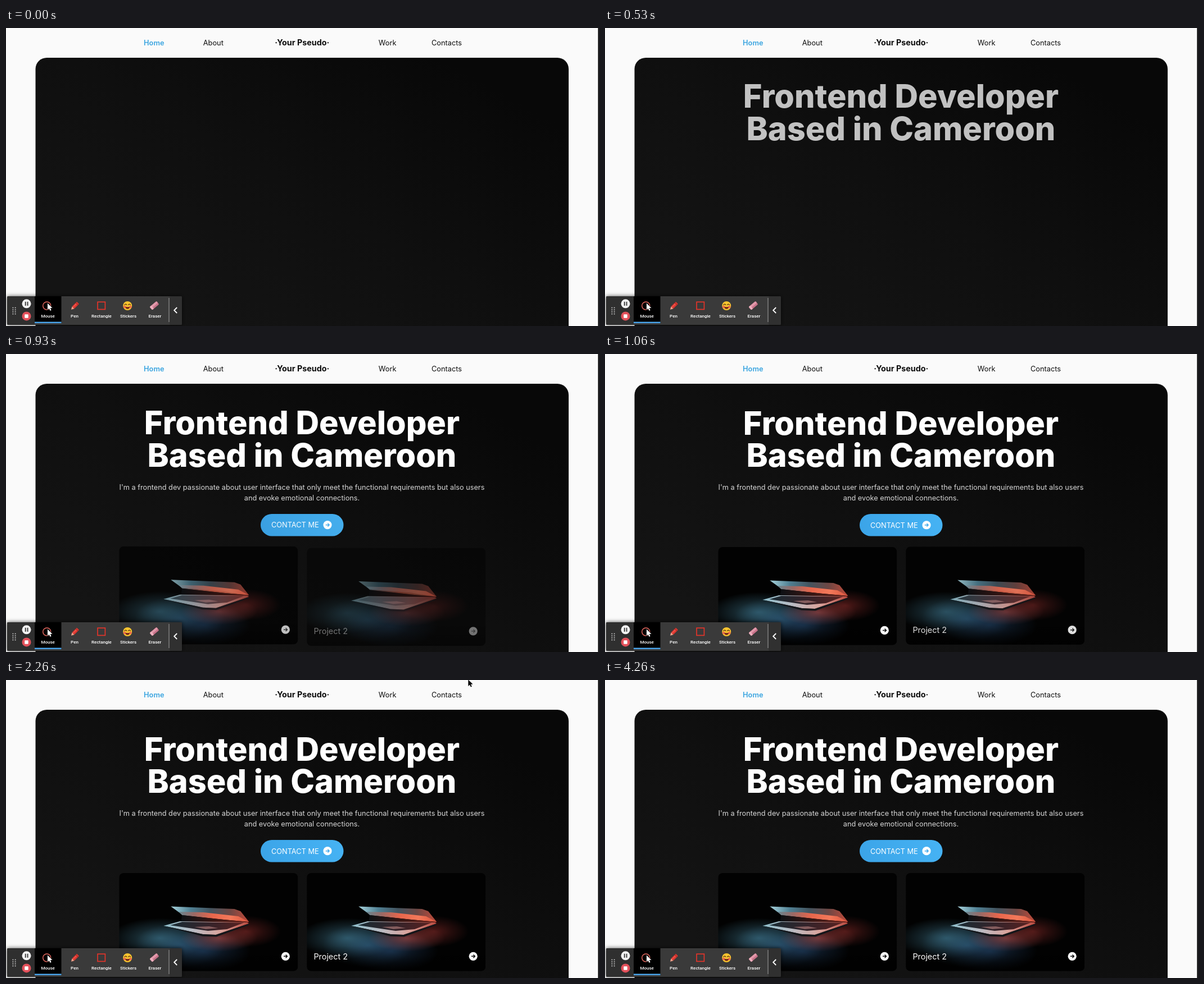
Animation of 1055x531 px, one loop 5730 ms. Source, as an HTML page with a canvas:

```html
<!DOCTYPE html>
<html lang="en">
<head>
<meta charset="utf-8">
<title>Portfolio hero</title>
<style>
  html, body { margin: 0; width: 100%; height: 100%; overflow: hidden; background: #fafafa; }
  canvas, svg { position: absolute; left: 0; top: 0; width: 1055px; height: 531px; }
  text { font: 400 12.8px Inter, sans-serif; font-optical-sizing: none; fill: #0c0c0c; }
  .mid { text-anchor: middle; }
  .home { font-weight: 600; fill: #3ba5e0; }
  .logo { font-size: 14.3px; font-weight: 700; }
  .title text { font-size: 57.6px; font-weight: 800; fill: #fff; }
  .intro text { font-size: 12.74px; fill: #d6d6d6; }
  .light { fill: #fff; }
  .label { font-size: 14.4px; fill: #fff; }
  .tools text { font: 500 8px Roboto, sans-serif; fill: #fff; text-anchor: middle; }
</style>
</head>
<body>
<canvas id="stage"></canvas>
<svg viewBox="0 0 1055 531">
  <text class="mid home" x="263.3" y="31">Home</text>
  <text class="mid" x="368.8" y="31">About</text>
  <text class="mid logo" x="526.7" y="31">·Your Pseudo·</text>
  <text class="mid" x="678.7" y="31">Work</text>
  <text class="mid" x="784" y="31">Contacts</text>
  <g class="title" data-step="title">
    <text class="mid" x="526.5" y="143.5">Frontend Developer</text>
    <text class="mid" x="526.5" y="201.1">Based in Cameroon</text>
  </g>
  <g class="intro" data-step="intro">
    <text class="mid" x="526.5" y="242">I'm a frontend dev passionate about user interface that only meet the functional requirements but also users</text>
    <text class="mid" x="526.5" y="261.2">and evoke emotional connections.</text>
  </g>
  <g data-step="button"><text class="mid light" x="514.3" y="309.6">CONTACT ME</text></g>
  <g data-step="cardB"><text class="label" x="547.4" y="497.5">Project 2</text></g>
  <g class="tools">
    <text x="74.7" y="515.6">Mouse</text>
    <text x="122" y="515.6">Pen</text>
    <text x="170" y="515.6">Rectangle</text>
    <text x="217.5" y="515.6">Stickers</text>
    <text x="265" y="515.6">Eraser</text>
  </g>
</svg>
<script>
const W = 1055, H = 531, LOOP = 5730;
const FADE = 300, RISE = 10;
const starts = { title: 352, intro: 573, button: 660, cardA: 750, cardB: 837 };
const CURSOR_IN = 2200, CURSOR_OUT = 4260;

const canvas = document.getElementById('stage');
const ctx = canvas.getContext('2d');
const groups = [...document.querySelectorAll('[data-step]')];
const dpr = window.devicePixelRatio || 1;
canvas.width = W * dpr;
canvas.height = H * dpr;

// Fade in while an underdamped spring brings the part up to its place.
function entrance(step, time) {
  const ms = time - starts[step];
  if (ms <= 0) return { alpha: 0, y: RISE };
  const alpha = 1 - Math.pow(1 - Math.min(1, ms / FADE), 1.5);
  const s = ms / 1000, decay = 12.5, freq = 18.54;
  const swing = Math.cos(freq * s) + decay / freq * Math.sin(freq * s);
  return { alpha, y: RISE * Math.exp(-decay * s) * swing };
}

function box(x, y, w, h, fill, r = 0) {
  ctx.beginPath();
  ctx.roundRect(x, y, w, h, r);
  ctx.fillStyle = fill;
  ctx.fill();
}

function disc(x, y, r, fill) {
  ctx.beginPath();
  ctx.arc(x, y, r, 0, Math.PI * 2);
  ctx.fillStyle = fill;
  ctx.fill();
}

function trace(points, close = true) {
  ctx.beginPath();
  points.forEach(([x, y]) => ctx.lineTo(x, y));
  if (close) ctx.closePath();
}

function shape(fill, ...points) {
  trace(points);
  ctx.fillStyle = fill;
  ctx.fill();
}

function line(color, width, ...points) {
  trace(points, false);
  ctx.strokeStyle = color;
  ctx.lineWidth = width;
  ctx.stroke();
}

function blend(x0, y0, x1, y1, ...colors) {
  const g = ctx.createLinearGradient(x0, y0, x1, y1);
  colors.forEach((c, i) => g.addColorStop(i / (colors.length - 1), c));
  return g;
}

function at(x, y, draw, angle = 0) {
  ctx.save();
  ctx.translate(x, y);
  ctx.rotate(angle);
  draw();
  ctx.restore();
}

function glow(x, y, rx, ry, rgb, alpha, angle = 0) {
  at(x, y, () => {
    ctx.scale(1, ry / rx);
    const g = ctx.createRadialGradient(0, 0, 0, 0, 0, rx);
    g.addColorStop(0, `rgba(${rgb},${alpha})`);
    g.addColorStop(.5, `rgba(${rgb},${alpha * .45})`);
    g.addColorStop(1, `rgba(${rgb},0)`);
    disc(0, 0, rx, g);
  }, angle);
}

function arrowBadge(x, y, color) {
  disc(x, y, 7.6, '#fff');
  line(color, 1.5, [x - 3.3, y], [x + 2.6, y]);
  line(color, 1.5, [x + .3, y - 2.8], [x + 3.1, y], [x + .3, y + 2.8]);
}

function pointer(x, y, fill, edge) {
  at(x, y, () => {
    trace([[0, 0], [0, 11.5], [2.7, 9.2], [4.6, 13.2], [6.5, 12.3], [4.7, 8.4], [8.3, 8.2]]);
    ctx.strokeStyle = edge;
    ctx.lineWidth = 1.4;
    ctx.stroke();
    ctx.fillStyle = fill;
    ctx.fill();
  });
}

function laptop() {
  glow(72, 116, 88, 36, '70,132,156', .6);
  glow(108, 128, 80, 40, '60,118,152', .5);
  glow(150, 140, 84, 36, '40,78,122', .6);
  glow(178, 116, 68, 24, '186,84,84', .6);
  glow(226, 104, 62, 28, '130,40,38', .6);

  // Lid, with the lit screen showing along its lower edge.
  shape(blend(93, 0, 231, 0, '#a4d0da', '#4f7f92', '#43545f', '#6e4744', '#c24a39'),
    [92, 59.5], [205, 64], [216, 68], [231, 87], [186, 80], [112, 74]);
  shape(blend(100, 0, 231, 0, '#5d8d9c', '#9a6a66', '#e8664c', '#f4795a', '#d9553f'),
    [106, 69], [150, 70], [212, 77], [231, 87], [186, 83], [112, 75]);
  shape(blend(110, 0, 231, 0, '#0c1014', '#3b1714', '#6b231d'),
    [112, 75], [186, 83], [231, 87], [228, 89], [110, 87]);

  // Base: rim, keyboard, palm rest and front edge.
  shape(blend(80, 0, 231, 0, '#8dbecb', '#b9bcc4', '#d9a39c', '#b8473c'),
    [79, 94], [108, 86], [228, 88], [231, 90], [172, 110], [149, 109]);
  shape(blend(95, 0, 225, 0, '#1a2a32', '#35232a', '#5a211f'),
    [91, 93], [112, 87], [222, 88.5], [192, 100], [158, 103]);
  shape('rgba(214,150,146,.5)', [134, 96], [160, 95], [176, 98], [154, 100]);
  shape('#14161a', [79, 94], [149, 109], [172, 110], [231, 90], [230, 93], [173, 113.5], [148, 112.5]);
}

function card(x, step, time) {
  const { alpha, y } = entrance(step, time);
  ctx.globalAlpha = alpha;
  at(x, 344 + y, () => {
    ctx.beginPath();
    ctx.roundRect(0, 0, 318, 174.5, 8);
    ctx.clip();
    box(0, 0, 318, 175, '#020202');
    laptop();
    box(0, 130, 318, 45, blend(0, 130, 0, 175, 'rgba(0,0,0,0)', 'rgba(0,0,0,.7)'));
    arrowBadge(296, 148.3, '#080808');
  });
  ctx.globalAlpha = 1;
}

function button(time) {
  const { alpha, y } = entrance('button', time);
  ctx.globalAlpha = alpha;
  at(0, y, () => {
    box(453, 285, 147.5, 39.5, blend(453, 324, 600, 285, '#3ba4e8', '#46b3f4'), 19.75);
    arrowBadge(572, 304.7, '#3fa9ec');
  });
  ctx.globalAlpha = 1;
}

function sticker() {
  disc(0, 0, 8, '#f8c52f');
  disc(-5, 2, 2.3, '#ee6a4c');
  disc(5, 2, 2.3, '#ee6a4c');
  for (const x of [-3.3, 3.3]) {
    ctx.beginPath();
    ctx.arc(x, -1, 1.9, Math.PI, 0);
    ctx.strokeStyle = '#5b3414';
    ctx.lineWidth = 1.2;
    ctx.stroke();
  }
  ctx.beginPath();
  ctx.arc(0, 2, 3.7, 0, Math.PI);
  ctx.fillStyle = '#7a2a1c';
  ctx.fill();
}

function pen() {
  box(-5, -2.8, 12, 5.6, '#e0362f', 1);
  box(4, -2.8, 1, 5.6, '#8f2522');
  shape('#f0a08a', [-5, -2.8], [-10, 0], [-5, 2.8]);
  line('#f36b60', 1, [-5, -.7], [4, -.7]);
}

function eraser() {
  box(-8, -3.6, 16, 7.2, '#c8728a', 1.6);
  box(-8, -3.6, 16, 4, '#e298aa', 1.6);
  box(-8, -3.6, 4, 7.2, '#ecb0be', 1.6);
}

function toolbar() {
  ctx.save();
  ctx.shadowColor = 'rgba(0,0,0,.7)';
  ctx.shadowBlur = 7 * dpr;
  box(2, 478, 311, 51, '#3a3a3a', 2);
  ctx.restore();
  box(2, 478, 49, 51, '#2f2f2f', 2);
  box(291, 478, 22, 51, '#303030', 2);
  box(51, 478, 47.5, 48, '#000');
  box(51, 523.4, 47.5, 2.6, '#4aa3e8');
  box(289.5, 481, 1, 43, '#a0a0a0');

  for (let i = 0; i < 8; i++) disc(12.4 + i % 2 * 4.2, 498.6 + (i >> 1) * 3.6, 1, '#d0d0d0');
  disc(36.5, 491.3, 8, '#f4f4f4');
  box(33.8, 487.8, 1.8, 7, '#333');
  box(37.6, 487.8, 1.8, 7, '#333');
  disc(36.5, 513.4, 8, '#e2505a');
  box(33.2, 510.2, 6.5, 6.5, '#fff', .8);

  ctx.beginPath();
  ctx.arc(72.7, 495, 7, 0, Math.PI * 2);
  ctx.strokeStyle = '#e4685f';
  ctx.lineWidth = 1.5;
  ctx.stroke();
  pointer(74, 490.5, '#fff', '#111');
  at(123, 494.7, pen, -Math.PI / 4);
  ctx.strokeStyle = '#e3342a';
  ctx.lineWidth = 1.7;
  ctx.strokeRect(163, 488.2, 13.4, 13.2);
  at(216.2, 495, sticker);
  at(264, 494.6, eraser, -Math.PI / 4.5);
  line('#fff', 1.8, [304.2, 498], [299.2, 503], [304.2, 508]);
}

function render(time) {
  ctx.setTransform(dpr, 0, 0, dpr, 0, 0);
  box(0, 0, W, H, '#fafafa');
  box(52.5, 53, 948.5, 520, blend(690, 5, 364, 580, '#080808', '#0f0f0f', '#141414'), 20);
  button(time);
  card(201.3, 'cardA', time);
  card(535.2, 'cardB', time);
  toolbar();
  box(1053.3, 0, 2, H, '#0a0a0a');
  if (time >= CURSOR_IN && time < CURSOR_OUT) pointer(822.3, -.6, '#0a0a0a', '#fff');

  for (const group of groups) {
    const { alpha, y } = entrance(group.dataset.step, time);
    group.setAttribute('opacity', alpha);
    group.setAttribute('transform', `translate(0 ${y})`);
  }
}

const origin = performance.now();
function tick() {
  render((performance.now() - origin) % LOOP);
  requestAnimationFrame(tick);
}
tick();
</script>
</body>
</html>
```
